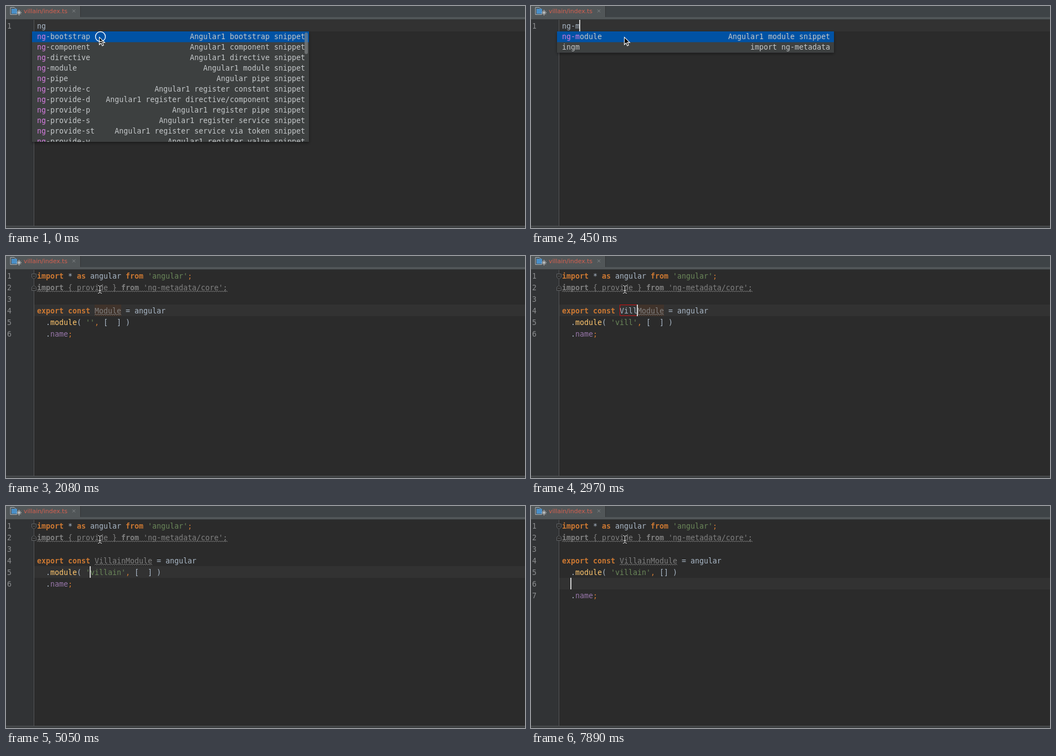
Recreate the animation shown at these times as an HTML page. Size 937 by 402 pixels, loop 8000 ms.

```html
<!DOCTYPE html>
<html lang="en">
<head>
<meta charset="utf-8">
<title>Snippet expansion</title>
<style>
html, body { margin: 0; height: 100%; overflow: hidden; background: #2b2b2b; }
svg { display: block; width: 100%; height: 100%; }
text { font: 13.29px "DejaVu Sans Mono", monospace; white-space: pre; fill: #a9b7c6; }
.tab { font: 10.9px "DejaVu Sans", sans-serif; fill: #d6604f; }
.num { fill: #8c8e90; }
.key { fill: #cc7832; font-weight: bold; }
.punct { fill: #cc7832; }
.str { fill: #6a8759; }
.fn { fill: #ffc66d; }
.prop { fill: #9876aa; }
.dim { fill: #808080; }
.dimkey { fill: #808080; font-weight: bold; }
.brace { fill: #ffef28; font-weight: bold; }
.item { fill: #c4c7c9; }
.match { fill: #d67ce0; }
</style>
</head>
<body>
<svg viewBox="0 0 937 402" preserveAspectRatio="none">
  <defs>
    <filter id="shadow" x="-5%" y="-20%" width="110%" height="150%">
      <feDropShadow dx="0" dy="2" stdDeviation="2.5" flood-opacity=".45"/>
    </filter>
    <clipPath id="list"><rect x="47" y="46" width="500" height="200"/></clipPath>
  </defs>
  <rect width="937" height="402" fill="#2b2b2b"/>
  <rect y="24" width="50" height="375" fill="#313335"/>
  <rect width="937" height="21" fill="#3e4346"/>
  <rect y="20" width="937" height="4" fill="#515658"/>
  <rect width="134" height="21" fill="#515658"/>
  <path d="M134.5 0V20M0 24.5H937" stroke="#323536"/>
  <path d="M8 2.5h7l4 4v9H8z" fill="none" stroke="#a5b4be"/>
  <rect x="10" y="5" width="10" height="9" fill="#4a8fc7"/>
  <path d="M23.5 7v10M19 12h9M20.3 8.8l6.4 6.4M26.7 8.8l-6.4 6.4" stroke="#d5d5d5"/>
  <text class="tab" x="32" y="13">villain/index.ts</text>
  <path d="M120 6.5l5 5m0-5l-5 5" stroke="#838789"/>
  <g id="scene"></g>
  <rect y="398" width="937" height="4" fill="#3c3f41"/>
  <path d="M0 398.5H937" stroke="#555759"/>
</svg>
<script>
const LOOP = 8000, LEFT = 56, CHAR = 8, ROW = 21, TOP = 25;
const scene = document.getElementById('scene');

const TYPING = [2530, 2680, 2820, 2970, 3110, 3410, 3560];
// time, caret x, row, visible
const CARET = [
  [0, 72, 0, false], [150, 72, 0, true], [300, 80, 0, true], [450, 88, 0, true], [590, 96, 0, true],
  [1190, 160, 3, true], [2080, 160, 3, false], [2530, 160, 3, true],
  [4150, 208, 4, true], [5050, 152, 4, true], [6100, 240, 4, true],
  [6850, 264, 4, true], [7740, 264, 4, false], [7890, 72, 5, true]
];
const SNIPPETS = [
  ['ng-bootstrap', 'Angular1 bootstrap snippet'],
  ['ng-component', 'Angular1 component snippet'],
  ['ng-directive', 'Angular1 directive snippet'],
  ['ng-module', 'Angular1 module snippet'],
  ['ng-pipe', 'Angular pipe snippet'],
  ['ng-provide-c', 'Angular1 register constant snippet'],
  ['ng-provide-d', 'Angular1 register directive/component snippet'],
  ['ng-provide-p', 'Angular1 register pipe snippet'],
  ['ng-provide-s', 'Angular1 register service snippet'],
  ['ng-provide-st', 'Angular1 register service via token snippet'],
  ['ng-provide-v', 'Angular1 register value snippet']
];
const MODULE = SNIPPETS[3], IMPORT = ['ingm', 'import ng-metadata'];

const rowTop = row => TOP + row * ROW;
const rect = (x, y, w, h, fill, extra = '') =>
  `<rect x="${x}" y="${y}" width="${w}" height="${h}" fill="${fill}" ${extra}/>`;
const span = (cls, text) => `<tspan class="${cls}">${text}</tspan>`;
const line = (row, content) => `<text x="${LEFT}" y="${rowTop(row) + 16}">${content}</text>`;
const rowBack = (x, row, w, fill) => rect(x, rowTop(row), w, ROW, fill);
const path = (d, stroke, fill = 'none') => `<path d="${d}" stroke="${stroke}" fill="${fill}"/>`;

function wave(x, row, width) {
  const y = rowTop(row) + 19;
  return path(`M${x} ${y}` + 'l2 -2l2 2'.repeat(width / 4), '#777', 'none');
}

function popup(items, typed, barOpacity) {
  const height = Math.min(200, items.length * 19 + 0.5);
  let out = rect(47, 46, 500, height, '#3c3f41', 'filter="url(#shadow)"') + rect(47, 46, 500, 19.5, '#0052a4');
  out += '<g clip-path="url(#list)">';
  items.forEach(([name, note], i) => {
    const hit = name.startsWith(typed) ? typed.length : 0;
    const y = 60 + i * 19;
    out += `<text class="item" x="${LEFT}" y="${y}">${span('match', name.slice(0, hit))}${name.slice(hit)}</text>
      <text class="item" x="540" y="${y}" text-anchor="end">${note}</text>`;
  });
  return out + '</g>' + rect(539, 48, 6, 39, '#8a8d8f', `rx="3" opacity="${barOpacity}"`);
}

function completion(t) {
  const typed = 'ng-mo'.slice(0, t < 300 ? 2 : t < 450 ? 3 : t < 590 ? 4 : 5);
  const items = t < 450 ? SNIPPETS : t < 590 ? [MODULE, IMPORT] : [MODULE];
  return line(0, typed) + popup(items, typed, t < 150 ? .6 : t < 300 ? .3 : 0);
}

function moduleCode(t) {
  const analysed = t >= 1480;
  const typedCount = TYPING.filter(at => at <= t).length;
  const name = 'Villain'.slice(0, typedCount);
  const nameWidth = typedCount * CHAR;
  const plainCount = t < 3410 ? typedCount : 0;
  const unusedX = 160 + plainCount * CHAR;
  const unusedWidth = (typedCount - plainCount + 6) * CHAR;
  const squares = t >= 6100 && t < 6850, parens = t >= 6850 && t < 7890;
  const lit = (on, text) => on ? span('brace', text) : text;
  const style = (cls, text) => analysed ? span(cls, text) : text;
  let out = '';

  if (analysed && t < 4450) out += rowBack(unusedX, 3, unusedWidth, '#40332b');
  if (t >= 4150 && t < 5050) out += rowBack(152, 4, 56, '#214283');
  if (squares || parens) {
    for (const x of squares ? [232, 256] : [128, 256]) out += rowBack(x, 4, CHAR, '#3b514d');
  }

  out += line(0, `${span('key', 'import')} * ${span('key', 'as')} angular `
    + `${analysed ? span('key', 'from') : 'from'} ${span('str', "'angular'")}${span('punct', ';')}`);
  out += line(1, analysed
    ? span('dimkey', 'import') + span('dim', ' { provide } ') + span('dimkey', 'from') + span('dim', " 'ng-metadata/core';")
    : `${span('key', 'import')} { provide } from ${span('str', "'ng-metadata/core'")}${span('punct', ';')}`);
  out += line(3, `${span('key', 'export const')} ${name.slice(0, plainCount)}`
    + `${style('dim', name.slice(plainCount) + 'Module')} = angular`);
  out += line(4, `  .${style('fn', 'module')}${lit(parens, '(')} ${span('str', `'${name.toLowerCase()}'`)}${span('punct', ',')} `
    + `${lit(squares, '[')}${t < 6850 ? '  ' : ''}${lit(squares, ']')} ${lit(parens, ')')}`);
  out += line(t < 7890 ? 5 : 6, `  .${style('prop', 'name')}${span('punct', ';')}`);

  if (analysed) {
    out += wave(LEFT, 1, 344) + wave(unusedX, 3, unusedWidth);
    out += path('M46.5 32.5h8v6l-4 3l-4 -3z', '#606366', '#2b2b2b') + path('M48.5 36.5h4', '#606366');
    out += path('M46.5 62.5h8v-6l-4 -3l-4 3z', '#606366', '#2b2b2b') + path('M48.5 58.5h4', '#606366');
  }
  if (typedCount && t < 4150) {
    out += path(`M160.5 88.5h${nameWidth - 1}v19.5h${1 - nameWidth}z`, '#d01010');
    const edge = t >= 3850 ? 56 : t >= 3260 ? 40 : 0;
    out += rect(160, 87, edge, 1, '#a01414');
  }
  return out;
}

const arrow = '<path d="M168.5 56.5v13.5l3.2 -3l2.2 5l2.3 -1l-2.2 -4.9h4.4z" fill="#000" stroke="#fff" stroke-width="1.1"/>';
const ring = '<circle cx="170.5" cy="55.5" r="9" fill="none" stroke="#fff" stroke-width="1.4"/>';
const beamShape = 'M166 53.5q3 0 3.5 2q.5 -2 3.5 -2M169.5 55v11M166 67.5q3 0 3.5 -2q.5 2 3.5 2M167.5 62.5h4';
const beam = `<path d="${beamShape}" fill="none" stroke="#222" stroke-width="2.6"/>` + path(beamShape, '#eee');

function render(t) {
  const [, x, row, visible] = CARET.findLast(([at]) => at <= t);
  const typing = t >= 2530 && t < 4150;
  const caretX = typing ? 160 + CHAR * TYPING.filter(at => at <= t).length : x;
  const lines = t < 1190 ? 1 : t < 7890 ? 6 : 7;

  let out = rowBack(51, row, 886, '#323232') + path('M50.5 25V398', '#555759');
  for (let i = 0; i < lines; i++) out += `<text class="num" x="2" y="${rowTop(i) + 16}">${i + 1}</text>`;
  out += t < 1190 ? completion(t) : moduleCode(t);
  if (visible) out += rect(caretX - 1, rowTop(row), 2, ROW, '#d0d0d0');
  return out + (t < 1190 ? arrow : beam) + (t < 150 ? ring : '');
}

let shown = '';
function tick() {
  const next = render(performance.now() % LOOP);
  if (next !== shown) scene.innerHTML = shown = next;
  requestAnimationFrame(tick);
}
tick();
</script>
</body>
</html>
```
